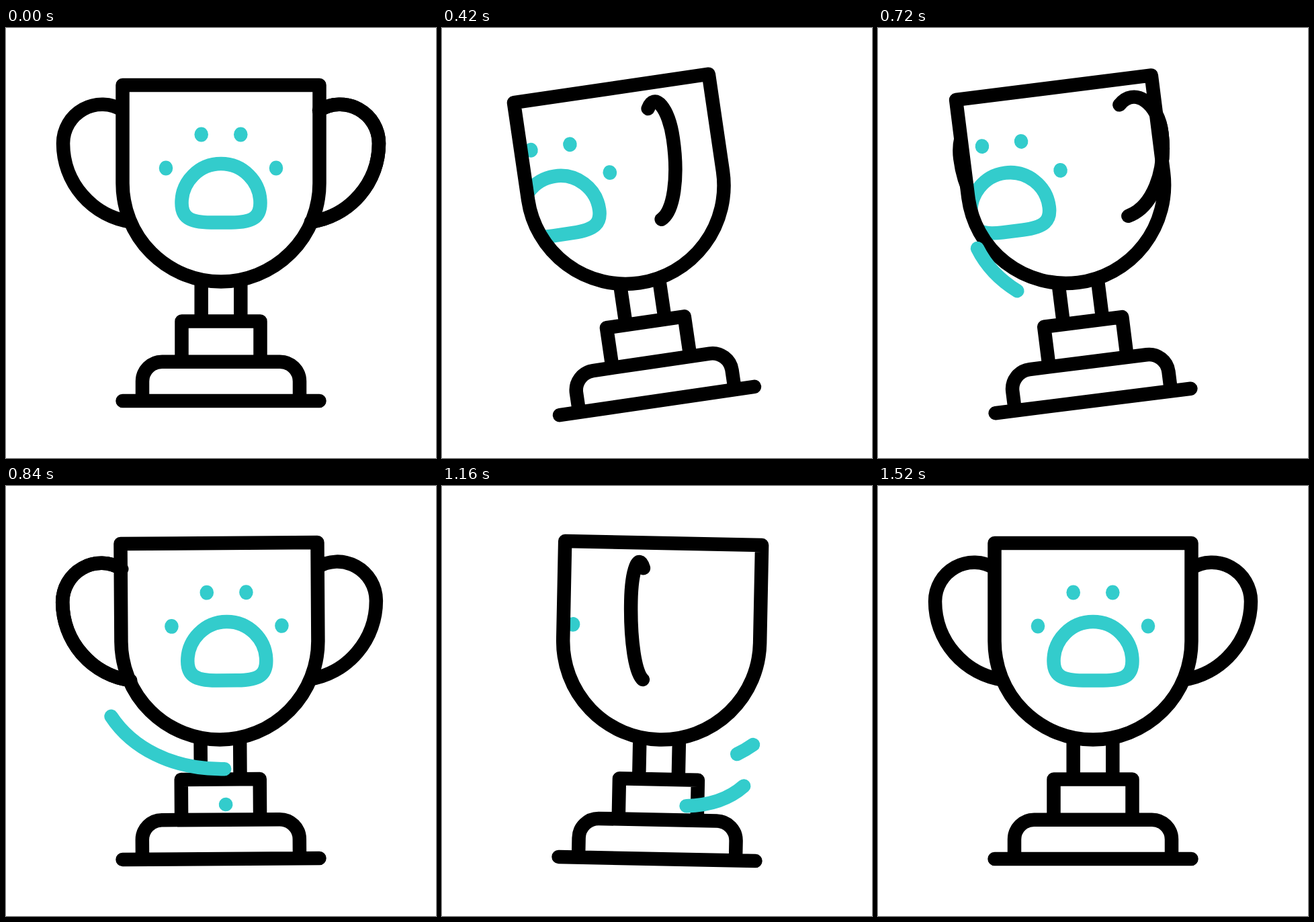
An HTML page that plays this animation: 640x640 px, repeating every 2400 ms.

```html
<!DOCTYPE html>
<html lang="en">
<head>
<meta charset="utf-8">
<title>Trophy</title>
<style>
  html, body { margin: 0; width: 100%; height: 100%; overflow: hidden; background: #fff; }
  svg { display: block; width: 100vw; height: 100vh; }
  .line { fill: none; stroke: #000; stroke-width: 20.5; stroke-linecap: round; stroke-linejoin: round; }
  .teal { stroke: #3cc; }
  .dots { fill: #3cc; }
</style>
</head>
<body>
<svg viewBox="0 0 640 640">
  <defs>
    <path id="cup" d="M173.5 85H466.5V231A146.5 146.5 0 0 1 173.5 231Z"/>
    <clipPath id="inside"><use href="#cup"/></clipPath>
  </defs>
  <g id="trophy">
    <path id="left" class="line"/>
    <path id="right" class="line"/>
    <use href="#cup" fill="#fff"/>
    <g clip-path="url(#inside)">
      <g id="paw">
        <g class="dots">
          <ellipse cx="290.7" cy="158.5" rx="10.3" ry="10.9"/>
          <ellipse cx="349.3" cy="158.5" rx="10.3" ry="10.9"/>
          <ellipse cx="238" cy="208.5" rx="10.3" ry="10.9"/>
          <ellipse cx="402" cy="208.5" rx="10.3" ry="10.9"/>
        </g>
        <path class="line teal" d="M261.5 260.5A58.5 58.5 0 0 1 378.5 260.5C378.5 281 368 289.5 335 289.5H305C272 289.5 261.5 281 261.5 260.5Z"/>
      </g>
    </g>
    <path class="line" d="M290.7 378V436M349.3 378V436M261.5 496V436.5H378.5V496"/>
    <path class="line" d="M203 555V526A29.3 29.3 0 0 1 232.3 496.7H407.7A29.3 29.3 0 0 1 437 526V555M173.5 555H466.5"/>
    <use href="#cup" class="line"/>
    <path id="front" class="line"/>
  </g>
  <path id="swoosh1" class="line teal" d="M148 328C176 384 240 420 316 421C372 423 425 412 463 385"/>
  <path id="swoosh2" class="line teal" d="M327 474C375 480 428 476 463 432"/>
</svg>
<script>
const LOOP = 2400;
const el = id => document.getElementById(id);

// [time, value] keys, eased in and out between neighbours
const TILT = [[0, 0], [600, -10.6], [1000, 5.1], [1300, -1.97], [1515, 0]];
const SPIN = [[0, 0], [600, -.838], [820, 0], [1210, .838], [1214, 1.162], [1420, 2]];
const SLIDE = [[0, 0], [600, -130], [1150, 215], [1150, -215], [1430, 0]];

function ease(t, from, to) {
  const p = Math.min(1, Math.max(0, (t - from) / (to - from)));
  return p * p * (3 - 2 * p);
}

function track(keys, t) {
  for (let i = 1; i < keys.length; i++) {
    const [t0, v0] = keys[i - 1], [t1, v1] = keys[i];
    if (t < t1) return v0 + (v1 - v0) * ease(t, t0, t1);
  }
  return keys[keys.length - 1][1];
}

// side is -1 for left, 1 for right; k narrows the handle towards the axis
function handle(side, k) {
  const x = v => (320 + side * k * v).toFixed(2);
  const sweep = side > 0 ? 1 : 0;
  const arc = (r, end, y) => `A${(r * k).toFixed(2)} ${r} 0 0 ${sweep} ${x(end)} ${y}`;
  return `M${x(146)} 122.7` + arc(58, 235, 172) + arc(118, 134, 288.5);
}

function trim(path, tail, head) {
  const len = path.getTotalLength();
  path.style.display = head > 0 && tail < 1 ? "" : "none";
  path.style.strokeDasharray = `${Math.max(.01, (head - tail) * len)} ${len * 2}`;
  path.style.strokeDashoffset = -tail * len;
}

function draw(t) {
  const spin = track(SPIN, t);
  const k = Math.abs(1 - Math.abs(spin));
  const side = spin > 0 && spin < 1 ? -1 : 1;
  el("left").setAttribute("d", handle(-1, k));
  el("right").setAttribute("d", handle(1, k));
  el("front").setAttribute("d", spin === 0 || spin === 2 ? "" : handle(side, k));
  el("trophy").setAttribute("transform", `rotate(${track(TILT, t)} 320 555)`);
  el("paw").setAttribute("transform", `translate(${track(SLIDE, t)} 0)`);
  trim(el("swoosh1"), ease(t, 780, 1240), Math.min(1, 1.06 * ease(t, 555, 1085)));
  trim(el("swoosh2"), ease(t, 1040, 1415), ease(t, 830, 1260));
}

const start = performance.now();
function tick() {
  draw((performance.now() - start) % LOOP);
  requestAnimationFrame(tick);
}
tick();
</script>
</body>
</html>
```
